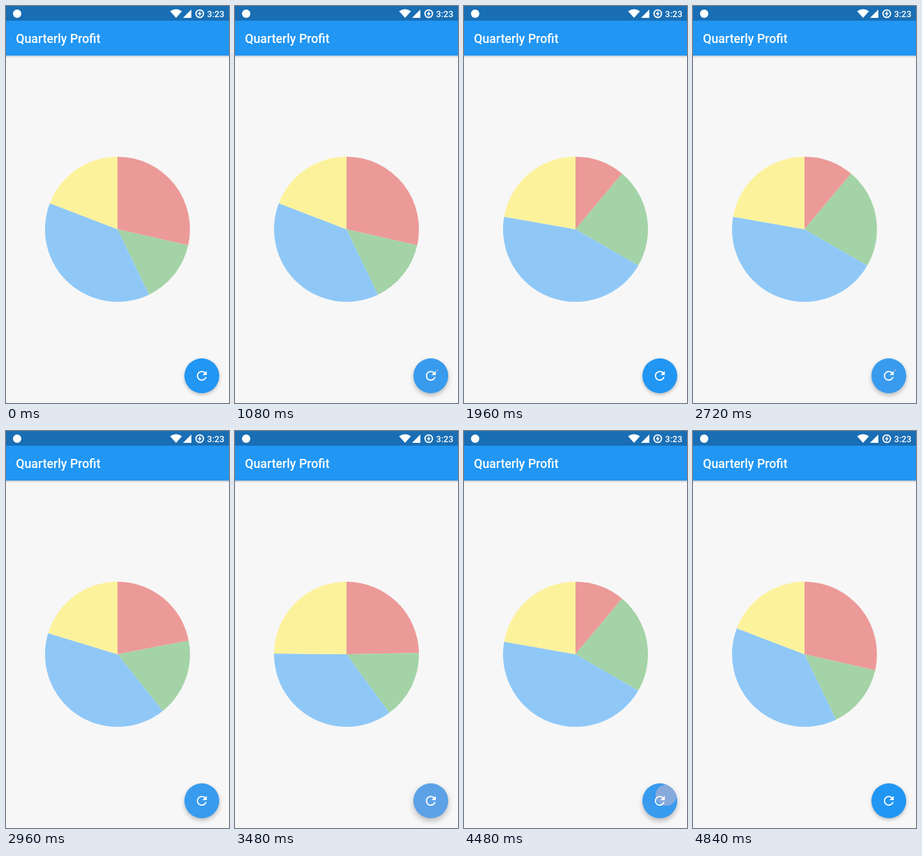
An HTML page that plays this animation: 320 by 569 pixels, repeating every 4880 ms.

```html
<!DOCTYPE html>
<html lang="en">
<head>
<meta charset="utf-8">
<title>Quarterly Profit</title>
<style>
html, body { margin: 0; width: 100%; height: 100%; overflow: hidden; background: #f7f7f7; }
svg { display: block; width: 100%; height: 100%; }
text { font-family: Roboto, sans-serif; font-weight: 500; fill: #fff; }
.bar { filter: drop-shadow(0 1px 1.5px rgba(0,0,0,.28)); }
</style>
</head>
<body>
<svg viewBox="0 0 320 569">
  <defs>
    <clipPath id="button"><circle cx="281" cy="530" r="25"/></clipPath>
  </defs>
  <rect width="320" height="569" fill="#f7f7f7"/>
  <rect class="bar" x="-5" y="-5" width="330" height="76" fill="#2196f3"/>
  <rect width="320" height="21" fill="#196eb4"/>

  <!-- status icons -->
  <g fill="#fff">
    <circle cx="16" cy="11" r="6"/>
    <path d="M235.5 7.5Q244 1.5 252.500 7.5L244 17Z"/>
    <path d="M254 17H266V5Z"/>
    <circle cx="278" cy="11" r="5.4" fill="none" stroke="#fff" stroke-width="1.8"/>
    <path d="M279 6.800L275 11.700H277.500L277 15.200L281 10.200H278.500Z"/>
  </g>
  <text x="313.300" y="15.500" font-size="12.6" text-anchor="end">3:23</text>
  <text x="14.200" y="52.500" font-size="17.78">Quarterly Profit</text>

  <g id="pie" transform="translate(160 320)"></g>

  <circle id="fab" cx="281" cy="530" r="25" fill="#2196f3"/>
  <g clip-path="url(#button)" fill="#c4b6cf">
    <circle id="glow" cx="281" cy="530" r="25"/>
    <circle id="ripple" cx="290" cy="522"/>
  </g>
  <path fill="#fff" transform="translate(270.330 519.330) scale(.889)"
    d="M17.65 6.35C16.2 4.9 14.21 4 12 4c-4.42 0-7.99 3.58-7.99 8s3.57 8 7.99 8c3.73 0 6.84-2.55 7.73-6h-2.08c-.82 2.33-3.04 4-5.65 4-3.31 0-6-2.69-6-6s2.69-6 6-6c1.66 0 3.14.69 4.22 1.78L13 11h7V4l-2.35 2.35z"/>
</svg>
<script>
const LOOP = 4880, STEP = 40, RADIUS = 104;
const colors = ['#ec9a98', '#a3d3a6', '#8fc8f7', '#fdf29c'];
// End angle of each slice, in degrees clockwise from the top
const charts = [
  [102.8, 154.2, 291, 360],
  [41.1, 107.4, 199.2, 360],
  [40, 120, 280, 360]
];
// Tap time and delay until the chart starts to change
const taps = [[1080, 53], [1600, 53], [2720, 53], [3320, 93], [3880, 53], [4440, 93]];

const byId = id => document.getElementById(id);
const clamp = x => Math.max(0, Math.min(1, x));
const set = (el, attrs) => { for (const k in attrs) el.setAttribute(k, attrs[k]); };

const slices = colors.map(fill => {
  const path = document.createElementNS('http://www.w3.org/2000/svg', 'path');
  path.setAttribute('fill', fill);
  return byId('pie').appendChild(path);
});

function point(deg) {
  const a = deg * Math.PI / 180;
  return `${RADIUS * Math.sin(a)} ${-RADIUS * Math.cos(a)}`;
}

function drawPie(ends) {
  let start = 0;
  slices.forEach((slice, i) => {
    const end = Math.min(ends[i], 359.99);
    const large = end - start > 180 ? 1 : 0;
    set(slice, { d: `M0 0L${point(start)}A${RADIUS} ${RADIUS} 0 ${large} 1 ${point(end)}Z` });
    start = end;
  });
}

function drawButton(age) {
  const active = age >= 0 && age < 400;
  const press = active ? clamp((age + 40) / 100) * clamp((360 - age) / 200) : 0;
  set(byId('glow'), { opacity: active ? 0.15 * clamp((80 - age) / 40) : 0 });
  set(byId('ripple'), {
    r: active ? 1.5 + age * 0.34 : 0,
    opacity: active ? 0.57 * clamp((290 - age) / 200) : 0
  });
  byId('fab').style.filter =
    `drop-shadow(0 ${2.5 + 2 * press}px ${2.5 + 1.5 * press}px rgba(0,0,0,.25))`;
}

function draw(now) {
  const t = Math.floor(now % LOOP / STEP) * STEP;
  const n = taps.filter(tap => tap[0] <= t).length;
  if (n) {
    const [time, delay] = taps[n - 1];
    const k = clamp((t - time - delay) / 300);
    const from = charts[(n - 1) % 3], to = charts[n % 3];
    drawPie(from.map((a, i) => a + (to[i] - a) * k));
    drawButton(t - time);
  } else {
    drawPie(charts[0]);
    drawButton(-1);
  }
}

const begin = performance.now();
function tick() {
  draw(performance.now() - begin);
  requestAnimationFrame(tick);
}
tick();
</script>
</body>
</html>
```
